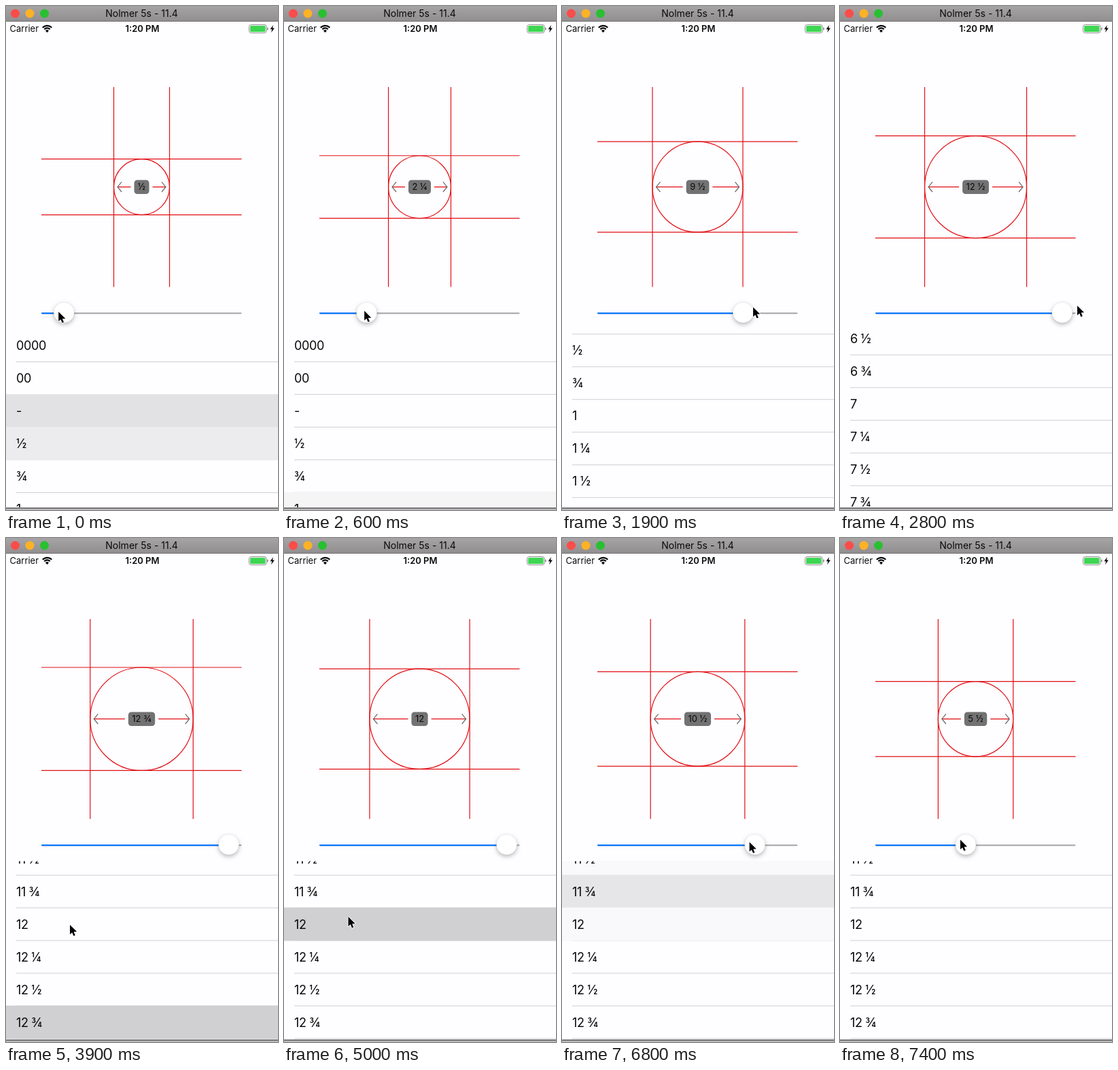
Recreate the animation shown at these times as an HTML page with a canvas. Size 400 by 740 pixels, loop 7.5 s.

```html
<!DOCTYPE html>
<html lang="en">
<head>
<meta charset="utf-8">
<title>Ring size picker</title>
<style>
  html, body { margin: 0; width: 100%; height: 100%; overflow: hidden; background: #fefdff; }
  canvas { display: block; }
</style>
</head>
<body>
<canvas id="stage" width="400" height="740"></canvas>
<script>
const ctx = document.getElementById('stage').getContext('2d');
const LOOP = 7500, STEP = 100, LAST = 52, FADE = 400;
const CX = 199.5, CY = 265.7, TABLE_TOP = 474.5, ROW = 48;
const BG = '#fefdff', RED = '#e01015';
const TAP_A = 4000, TAP_B = 5200, DRAG = 6600;

// Eased progress from 0 to 1 between two times.
function ease(t, from, to) {
  const u = Math.max(0, Math.min(1, (t - from) / (to - from)));
  return u * u * (3 - 2 * u);
}

const dragOut = t => ease(t, -175, 2905);
const dragBack = t => ease(t, 6400, LOOP);
const thumbX = t => 82.92 + 244.58 * dragOut(t) - 146 * dragBack(t);
const scrollY = t => 2283.5 * Math.min(1, t / 3082) ** 5.82;

function cursorAt(t) {
  if (t >= 6400) return [thumbX(t) - 8, 448 - 5 * dragBack(t)];
  let x = 77 + 1.125 * (thumbX(t) - 85), y = 449 - 9 * dragOut(t);
  // Moves after the first drag: start, end, x, y.
  for (const [from, to, tx, ty] of [[3100, 3900, 94, 568], [4900, 5200, 96, 522],
    [5500, 6000, 273, 426], [6000, 6400, 319.5, 448]]) {
    const k = ease(t, from, to);
    x += (tx - x) * k;
    y += (ty - y) * k;
  }
  return [x, y];
}

function selected(t) {
  if (t >= TAP_A && t < DRAG) return t < TAP_B ? 49 : 48;
  return Math.min(LAST, Math.floor((thumbX(t) - 68) / 4.98));
}

// Taps highlight at once; the slider cross-fades rows.
function highlight(row, t) {
  if (t >= TAP_A && t < DRAG) return +(selected(t) === row);
  let sum = 0;
  for (let k = 0; k < 20; k++) sum += selected(t - k * FADE / 20) === row;
  return sum / 20;
}

function sizeName(i) {
  if (i < 3) return ['0000', '00', '-'][i];
  const n = i - 1, whole = n >> 2;
  return [whole || '', ['', '¼', '½', '¾'][n % 4]].filter(Boolean).join(' ');
}

function rect(x, y, w, h, fill, r = 0) {
  ctx.fillStyle = fill;
  ctx.beginPath();
  ctx.roundRect(x, y, w, h, r);
  ctx.fill();
}

function disc(x, y, r, fill) {
  ctx.fillStyle = fill;
  ctx.beginPath();
  ctx.arc(x, y, r, 0, 7);
  ctx.fill();
}

function stroke(color, width, ...pts) {
  ctx.strokeStyle = color;
  ctx.lineWidth = width;
  ctx.beginPath();
  pts.forEach(p => ctx.lineTo(...p));
  ctx.stroke();
}

function polygon(fill, ...pts) {
  ctx.fillStyle = fill;
  ctx.beginPath();
  pts.forEach(p => ctx.lineTo(...p));
  ctx.closePath();
  ctx.fill();
}

function setFont(size, weight = 400) {
  ctx.font = `${weight} ${size}px Inter, Roboto, sans-serif`;
}

function text(str, x, y, size, align = 'left', weight = 400) {
  setFont(size, weight);
  ctx.textAlign = align;
  ctx.fillStyle = '#0a0a0a';
  ctx.fillText(str, x, y);
}

function drawChrome() {
  const bar = ctx.createLinearGradient(0, 0, 0, 22);
  bar.addColorStop(0, '#a7a4a6');
  bar.addColorStop(1, '#918e90');
  rect(0, 0, 400, 22, bar);
  rect(0, 22, 400, 1, '#777476');
  ['#fc4c49', '#fdb225', '#28c031'].forEach((c, i) => disc(13.5 + i * 21.5, 11, 6.5, c));
  text('Nolmer 5s - 11.4', CX, 16, 14, 'center');
  rect(0, 736, 400, 1, '#a3a1a3');
  rect(0, 737, 400, 1.5, '#5f5d5f');
  rect(0, 738.5, 400, 1.5, '#bebcbe');
}

function drawStatus() {
  text('Carrier', 5.5, 38, 13);
  text('1:20 PM', 200.5, 38, 13, 'center', 600);
  ctx.strokeStyle = '#000';
  ctx.lineWidth = 2.2;
  [5.6, 9.2].forEach(r => {
    ctx.beginPath();
    ctx.arc(60.5, 38, r, -Math.PI * .76, -Math.PI * .24);
    ctx.stroke();
  });
  ctx.fillStyle = '#000';
  ctx.beginPath();
  ctx.moveTo(60.5, 39);
  ctx.arc(60.5, 38.7, 3.4, -Math.PI * .76, -Math.PI * .24);
  ctx.fill();
  ctx.strokeStyle = '#8c8b8d';
  ctx.lineWidth = 1;
  ctx.beginPath();
  ctx.roundRect(357.5, 27.5, 25.5, 12, 3);
  ctx.stroke();
  rect(359, 29, 22.5, 9, '#3ed653', 1.5);
  rect(384, 31.5, 1.5, 4, '#8c8b8d', 1);
  polygon('#000', [392.8, 28], [388.5, 34.3], [391.2, 34.3], [390, 39], [394.8, 32.4], [392, 32.4]);
}

function drawRing(index) {
  const r = (82 + (index - 3) * 1.417) / 2, left = CX - r, right = CX + r;
  [-r, r].forEach(d => {
    stroke(RED, 1.2, [52, CY + d], [346.5, CY + d]);
    stroke(RED, 1.2, [CX + d, 119], [CX + d, 412.5]);
  });
  ctx.beginPath();
  ctx.arc(CX, CY, r, 0, 7);
  ctx.stroke();

  const label = sizeName(index);
  setFont(13);
  const half = ctx.measureText(label).width / 2 + 5.5;
  stroke(RED, 1.3, [left + 5.5, CY], [CX - half - 5, CY]);
  stroke(RED, 1.3, [CX + half + 5, CY], [right - 5.5, CY]);
  [[left + 5.5, 6], [right - 5.5, -6]].forEach(([x, d]) =>
    stroke('#6b6768', 1.2, [x + d, CY - 7.3], [x, CY], [x + d, CY + 7.3]));
  rect(CX - half, CY - 10.3, half * 2, 20.6, '#737273', 4.5);
  text(label, CX, CY + 4.6, 13, 'center');
}

function drawSlider(x) {
  rect(52, 450, 294.5, 2.2, '#b0aeb1', 1.1);
  rect(52, 450, x - 52, 2.2, '#0d78fd', 1.1);
  ctx.save();
  ctx.shadowColor = 'rgba(0,0,0,.28)';
  ctx.shadowBlur = 6;
  ctx.shadowOffsetY = 2.5;
  disc(x, 450.2, 15, '#fff');
  ctx.restore();
  ctx.strokeStyle = 'rgba(0,0,0,.08)';
  ctx.lineWidth = .6;
  ctx.stroke();
}

function drawTable(t) {
  const scroll = scrollY(t), first = Math.floor(scroll / ROW);
  ctx.save();
  ctx.beginPath();
  ctx.rect(0, TABLE_TOP, 400, 736 - TABLE_TOP);
  ctx.clip();
  ctx.letterSpacing = '-0.4px';
  for (let i = first; i <= Math.min(LAST, first + 6); i++) {
    const y = TABLE_TOP + i * ROW - scroll, glow = highlight(i, t);
    rect(15, y + ROW - .5, 385, 1, '#cfced1');
    if (glow) {
      rect(0, y - .5, 400, ROW + 1, BG);
      rect(0, y - .5, 400, ROW + 1, `rgba(208,207,210,${glow})`);
    }
    text(sizeName(i), 15, y + 30.5, 18.1);
  }
  ctx.restore();
}

function drawCursor(x, y) {
  ctx.save();
  ctx.translate(x, y);
  ctx.scale(.94, .94);
  const shape = [[0, 0], [0, 15], [3.4, 12], [5.8, 17.4], [8.3, 16.3], [6, 11], [10.8, 10.7]];
  ctx.lineJoin = 'round';
  stroke('#fff', 2, ...shape, [0, 0]);
  polygon('#000', ...shape);
  ctx.restore();
}

function draw(t) {
  rect(0, 0, 400, 740, BG);
  drawTable(t);
  drawRing(selected(t));
  drawSlider(thumbX(t));
  drawStatus();
  drawChrome();
  drawCursor(...cursorAt(t));
}

const start = performance.now();
function frame() {
  const t = (performance.now() - start) % LOOP;
  draw(Math.floor(t / STEP) * STEP);
  requestAnimationFrame(frame);
}
frame();
</script>
</body>
</html>
```
